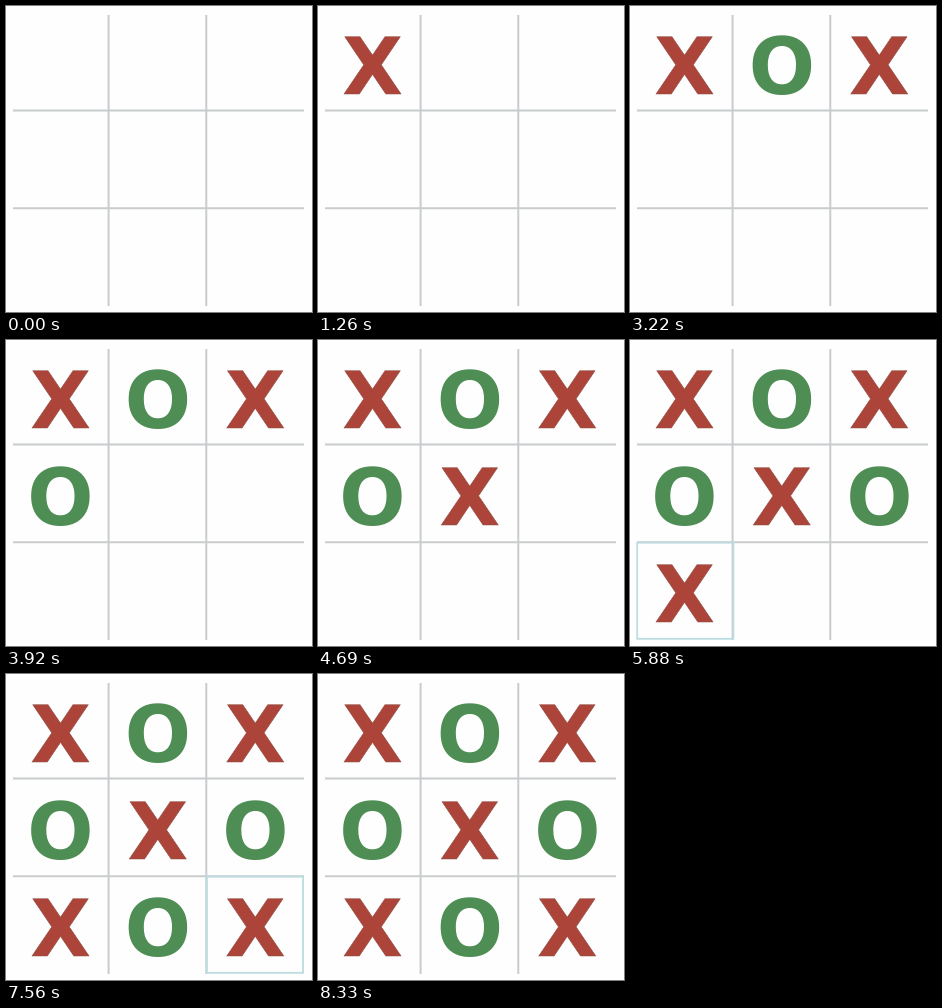
Recreate the animation shown at these times as an HTML page. Size 306 px wide and 306 px high, loop 8.4 s.

```html
<!DOCTYPE html>
<html lang="en">
<meta charset="utf-8">
<title>Tic-tac-toe</title>
<style>
  html, body { margin: 0; height: 100%; overflow: hidden; background: #fefefe; }
  svg { display: block; width: 100vw; height: 100vh; }
  .grid { stroke: #c9cccd; stroke-width: 2; }
  .focus { fill: none; stroke: #bbdce0; stroke-width: 1.8; }
  text { font: bold 78px "DejaVu Sans", sans-serif; text-anchor: middle; }
  .X { fill: #ad443a; stroke: #8c4f45; stroke-width: .5; }
  .O { fill: #4e8d53; }
</style>
<svg id="board" viewBox="0 0 306 306">
  <path class="grid" d="M102.6 9V300M200.3 9V300M7 104.5H298M7 202.3H298"/>
</svg>
<script>
const LOOP = 8400, TURN = 840, PITCH = 97.4;
// How long the focus frame stays on each cell, in ms
const HOLD = [350, 280, 280, 210, 280, 280, 280, 280, 210];
const board = document.getElementById('board');

function add(name, attrs, label = '') {
  const el = document.createElementNS('http://www.w3.org/2000/svg', name);
  for (const key in attrs) el.setAttribute(key, attrs[key]);
  el.textContent = label;
  return board.appendChild(el);
}

const cells = HOLD.map((hold, i) => {
  const col = i % 3, row = Math.floor(i / 3), mark = 'XO'[i % 2];
  return {
    start: (i + 1) * TURN,
    hold,
    focus: add('rect', { class: 'focus', x: 7.2 + 96.8 * col, y: 8.8 + 96.9 * row, width: 96.2, height: 96.2 }),
    mark: add('text', { class: mark, x: 54.5 + PITCH * col, y: 87.6 + PITCH * row }, mark)
  };
});

function show(el, on) {
  el.style.visibility = on ? 'visible' : 'hidden';
}

function draw(now) {
  const t = now % LOOP;
  for (const c of cells) {
    show(c.mark, t >= c.start);
    show(c.focus, t >= c.start && t < c.start + c.hold);
  }
  requestAnimationFrame(draw);
}
draw(performance.now());
</script>
</html>
```
